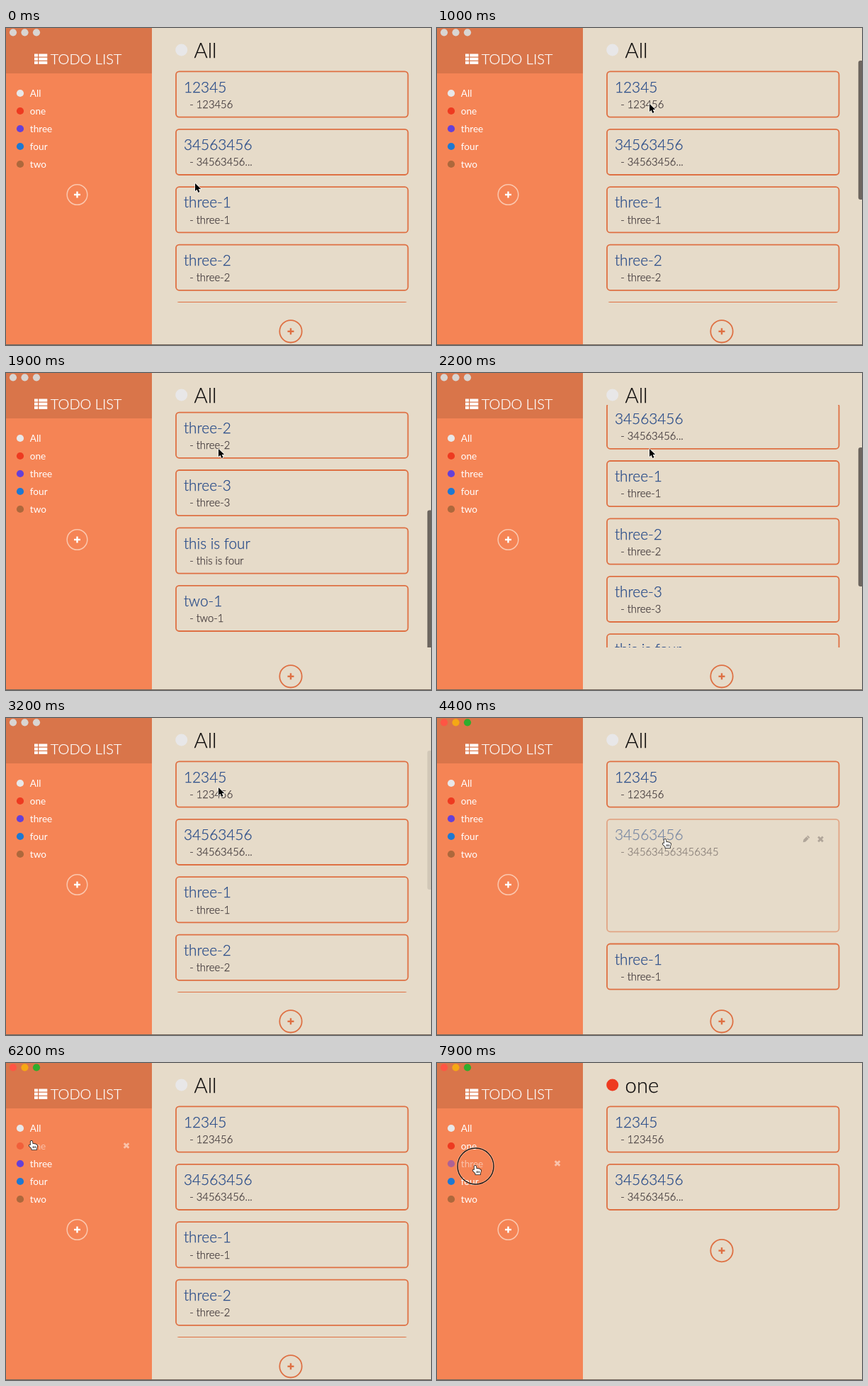
These frames come from a looping animation (600x447 px, 8 s). An HTML page with a canvas:

```html
<!DOCTYPE html>
<html lang="en">
<head>
<meta charset="utf-8">
<title>Todo list</title>
<style>
html, body { margin: 0; width: 100%; height: 100%; overflow: hidden; background: #e6dbc9; }
canvas { display: block; }
</style>
</head>
<body>
<canvas id="stage" width="600" height="447"></canvas>
<script>
const g = document.getElementById('stage').getContext('2d');
const LOOP = 8000, FRAME = 100;
const ORANGE = '#de7043', TOP = 45, BOTTOM = 387, FIRST = 60.5, STEP = 81.4, GROW = 94.3;

const groups = [['All', '#e8e7e8'], ['one', '#ee3a20'], ['three', '#6540d8'], ['four', '#1d78d2'], ['two', '#ad683c']];
const todos = [
  ['12345', '123456'], ['34563456', '34563456...', '345634563456345'], ['three-1', 'three-1'],
  ['three-2', 'three-2'], ['three-3', 'three-3'], ['this is four', 'this is four'], ['two-1', 'two-1']
];

// Keys are [time, value, ...]
const pointerKeys = [[0, 267, 219], [900, 300, 107], [2600, 300, 107], [3000, 300, 98], [3400, 300, 98],
  [3800, 322, 171], [5200, 322, 171], [6000, 36, 110], [7100, 36, 110], [7600, 54, 145]];
const scrollKeys = [[1000, 0], [1300, 128.7], [1600, 250], [1900, 250], [2200, 100.2], [2500, 0]];
const growKeys = [[3900, 0], [4200, 1], [4900, 1], [5200, 0]];
const barKeys = [[900, 0], [1000, 1], [3000, 1], [3240, 0]];
const clicks = [3900, 4900, 6700, 7900];
const ACTIVE = 3900, FILTER = 6800;

function track(keys, t) {
  const i = keys.findIndex(k => k[0] > t);
  if (i === 0) return keys[0].slice(1);
  if (i < 0) return keys[keys.length - 1].slice(1);
  const a = keys[i - 1], b = keys[i], u = (t - a[0]) / (b[0] - a[0]);
  const e = keys === pointerKeys ? u * u * (3 - 2 * u) : u;
  return a.slice(1).map((v, j) => v + (b[j + 1] - v) * e);
}

// A hairline outline gives the light face its slightly heavier look
function text(s, x, y, size, color, weight = 300) {
  g.font = `${weight} ${size}px Lato, sans-serif`;
  g.fillStyle = g.strokeStyle = color;
  g.fillText(s, x, y);
  if (weight === 300) {
    g.lineWidth = 0.25;
    g.strokeText(s, x, y);
  }
}
function rect(x, y, w, h, color) {
  g.fillStyle = color;
  g.fillRect(x, y, w, h);
}
function round(x, y, w, h, r) {
  g.beginPath();
  g.roundRect(x, y, w, h, r);
}
function dot(x, y, r, color) {
  g.beginPath();
  g.arc(x, y, r, 0, 7);
  g.fillStyle = color;
  g.fill();
}
function ring(x, y, r, width, color) {
  g.beginPath();
  g.arc(x, y, r, 0, 7);
  g.lineWidth = width;
  g.strokeStyle = color;
  g.stroke();
}
function plus(x, y, r, width, ringColor, color) {
  ring(x, y, r, width, ringColor);
  rect(x - 4.5, y - 1.2, 9, 2.4, color);
  rect(x - 1.2, y - 4.5, 2.4, 9, color);
}
function cross(x, y, color) {
  g.beginPath();
  g.moveTo(x - 3.3, y - 3.3); g.lineTo(x + 3.3, y + 3.3);
  g.moveTo(x + 3.3, y - 3.3); g.lineTo(x - 3.3, y + 3.3);
  g.lineWidth = 2.8;
  g.strokeStyle = color;
  g.stroke();
}
function pencil(x, y, color) {
  g.save();
  g.translate(x, y);
  g.rotate(-Math.PI / 4);
  g.fillStyle = color;
  g.fill(new Path2D('M-6 0L-3 -2H3V2H-3ZM3.7 -2H5.5V2H3.7Z'));
  g.restore();
}

const arrow = new Path2D('M0 0V13L3 10.4L5.2 15.2L7.6 14.2L5.5 9.5H9.6Z');
const hand = new Path2D('M-1.6 1Q0 -1.4 1.4 1L2 5Q4 3.8 5 5.4Q6.8 4.6 7.6 6.2Q9.6 5.8 9.4 8.2L8.4 12V14.5H0.4V12.4L-4 7.8Q-4 5.6 -1.4 7Z');
function pointer(x, y, isHand) {
  g.save();
  g.translate(x, y);
  g.scale(0.85, 0.85);
  g.lineJoin = 'round';
  g.lineWidth = isHand ? 1.8 : 1.6;
  g.strokeStyle = isHand ? '#111' : '#fff';
  g.fillStyle = isHand ? '#fff' : '#000';
  g.stroke(isHand ? hand : arrow);
  g.fill(isHand ? hand : arrow);
  if (isHand) for (const i of [2, 4, 6]) rect(i, 8.5, 0.9, 3.5, '#111');
  g.restore();
}

function sidebar(active, hover) {
  rect(0, 0, 206, 447, '#f58455');
  rect(0, 0, 206, 64, '#d9754a');
  const lights = active ? ['#ff5544', '#f5a814', '#2fad2d'] : Array(3).fill('#d9d5d2');
  lights.forEach((c, i) => dot(10 + i * 16.5, 6.3, 5.1, c));
  for (let i = 0; i < 3; i++) {
    const y = 36.5 + i * 5.2;
    rect(40, y, 5, 4, '#fff');
    rect(46.3, y, 12, 4, '#fff');
  }
  text('TODO LIST', 62.8, 50.5, 20, '#fff');
  groups.forEach(([name, color], i) => {
    const y = 92 + i * 25;
    g.globalAlpha = i === hover ? 0.5 : 1;
    dot(20, y, 5.1, color);
    text(name, 33.8, y + 4.5, 13.6, '#fff', 400);
    if (i === hover) cross(170, y - 0.5, '#fff');
    g.globalAlpha = 1;
  });
  plus(100.5, 235, 14.3, 1.5, '#fbc7ae', '#fff');
}

function cardBoxes(count, scroll, grow) {
  return todos.slice(0, count).map((todo, i) => ({
    todo,
    y: FIRST + i * STEP - scroll + (i > 1 ? grow * GROW : 0),
    h: 66 + (i === 1 ? grow * GROW : 0)
  }));
}

function card({ todo, y, h }, hovered, open) {
  g.globalAlpha = hovered ? 0.5 : 1;
  round(240, y + 0.9, 327.5, h - 1.8, 4.5);
  g.lineWidth = 1.8;
  g.strokeStyle = ORANGE;
  g.stroke();
  text(todo[0], 251, y + 30, 20.8, '#264a88');
  text('- ' + (open && todo[2] || todo[1]), 259.3, y + 52.3, 14.8, '#40383a');
  if (hovered) {
    pencil(521, y + 29, '#7a706a');
    cross(541.5, y + 29, '#7a706a');
  }
  g.globalAlpha = 1;
}

function draw(t) {
  const [px, py] = track(pointerKeys, t);
  const [scroll] = track(scrollKeys, t);
  const [grow] = track(growKeys, t);
  const [bar] = track(barKeys, t);
  const active = t >= ACTIVE, group = groups[t >= FILTER ? 1 : 0];
  const cards = cardBoxes(t >= FILTER ? 2 : todos.length, scroll, grow);
  const bottom = Math.min(BOTTOM, 61 + cards.length * STEP);

  const row = Math.floor((py - 79.5) / 25);
  const hoverRow = active && px < 206 && row >= 0 && row < groups.length ? row : -1;
  const hoverCard = active && px > 239 && px < 569 ? cards.findIndex(c => py > c.y && py < c.y + c.h) : -1;

  rect(0, 0, 600, 447, '#e6dbc9');
  sidebar(active, hoverRow);
  dot(247.7, 31, 8.5, group[1]);
  text(group[0], 265.6, 42, 29.2, '#0c0a0a');

  g.save();
  g.beginPath();
  g.rect(206, TOP, 394, bottom - TOP);
  g.clip();
  cards.forEach((c, i) => card(c, i === hoverCard, grow > 0));
  if (bar > 0) {
    g.globalAlpha = bar;
    round(594.8, 46 + scroll * 0.59, 8, 196, 3);
    g.fillStyle = '#6d665f';
    g.fill();
  }
  g.restore();

  plus(402, bottom + 40.8, 15.7, 1.8, ORANGE, ORANGE);
  rect(0, 446, 600, 1, '#77695e');

  if (clicks.some(c => t >= c && t < c + 200)) {
    ring(px + 0.5, py + 0.5, 25.5, 3, 'rgba(255,255,255,.35)');
    ring(px + 0.5, py + 0.5, 25.5, 1.4, '#1c1714');
  }
  pointer(px, py, hoverRow >= 0 || hoverCard >= 0);
}

const start = performance.now();
function tick() {
  const t = (performance.now() - start) % LOOP;
  draw(Math.floor(t / FRAME) * FRAME);
  requestAnimationFrame(tick);
}
tick();
</script>
</body>
</html>
```
